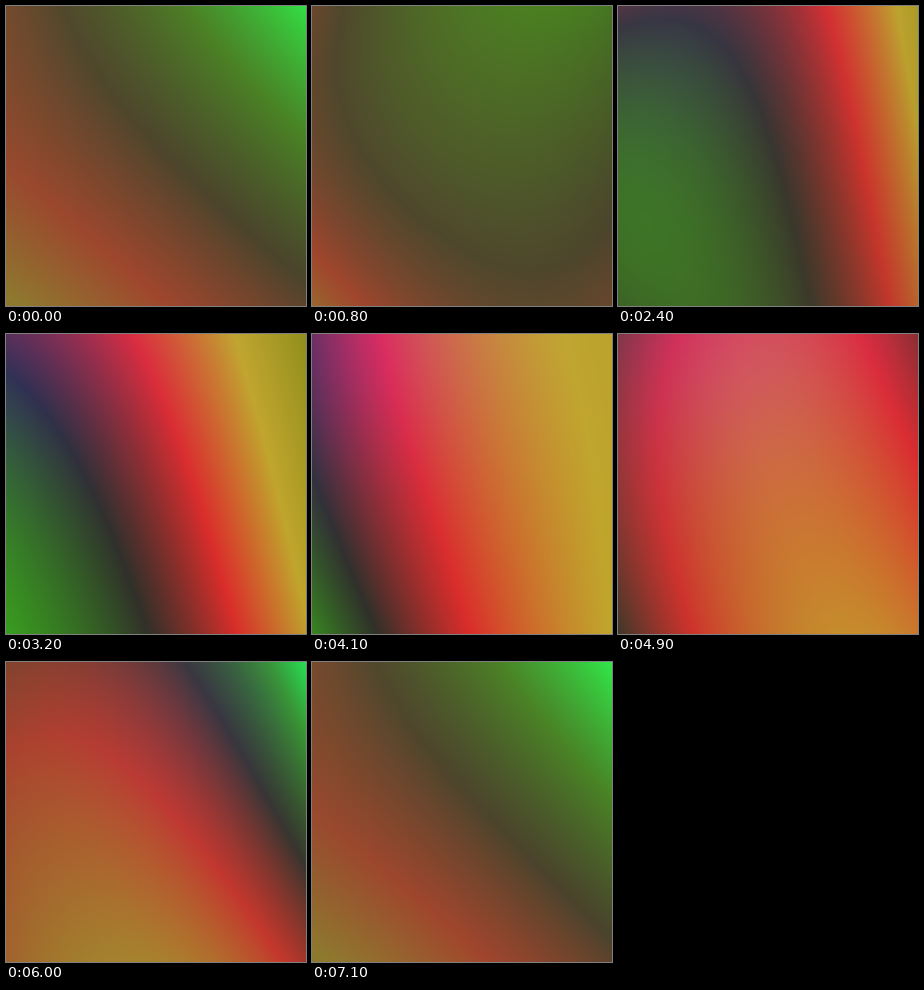
Write an HTML page with a canvas that moves like this. It is 300x300 px and loops after 7200 ms.

```html
<!DOCTYPE html>
<html lang="en">
<head>
<meta charset="utf-8">
<title>Colour drift</title>
<style>
  html, body { margin: 0; width: 100%; height: 100%; overflow: hidden; background: #000; }
  canvas { display: block; width: 100vw; height: 100vh; }
</style>
</head>
<body>
<canvas id="stage" width="300" height="300"></canvas>
<script>
const SIZE = 300, LOOP = 7200, STEP = 100;
const ctx = document.getElementById('stage').getContext('2d');
const image = ctx.createImageData(SIZE, SIZE);

// Bright green, green, shadow, red, yellow, olive
const ramp = [[30, 275, 78], [55, 150, 30], [48, 48, 40], [218, 45, 42], [192, 165, 44], [140, 140, 25]];
const earth = [108, 92, 48];

const mix = (a, b, k) => a + (b - a) * k;
const clamp = (v, lo, hi) => Math.min(hi, Math.max(lo, v));
const arch = s => 4 * s * (1 - s);

function draw(time) {
  const angle = time / LOOP * 2 * Math.PI;
  const wave = (base, swing, peak) => base + swing * Math.cos(angle - peak * Math.PI / 180);

  // Ramp position at the corners, and how far the field bows between them
  const topLeft = wave(2.38, 0.2, 300), topRight = wave(2.4, 2.5, 158);
  const lowLeft = wave(2.5, 1.6, 352), lowRight = wave(3.1, 0.95, 188);
  const bow = wave(-0.05, 0.9, 270), sideBow = wave(-0.15, 0.5, 250);

  // Blue glow sliding along the top edge
  const glowX = wave(0.5, 0.5, 350), glow = wave(28, 32, 210);

  const px = image.data;
  let o = 0;
  for (let row = 0; row < SIZE; row++) {
    const y = row / (SIZE - 1);
    const left = mix(topLeft, lowLeft, y), right = mix(topRight, lowRight, y);
    for (let col = 0; col < SIZE; col++) {
      const x = col / (SIZE - 1);
      const hue = mix(left, right, x) + bow * arch(x) + sideBow * arch(y) * (1 - x) ** 2;
      const pos = clamp(hue, 0, 4.999), i = Math.floor(pos);
      const rich = 0.5 - 0.5 * Math.cos(angle - 0.6 * x) + x * (0.5 - 0.35 * y);
      const dull = 0.6 * (1 - clamp(rich, 0, 1));
      const blue = glow * Math.exp(-4 * ((x - glowX) ** 2 + y * y));
      for (let c = 0; c < 3; c++) {
        const pure = mix(ramp[i][c], ramp[i + 1][c], pos - i);
        px[o++] = mix(pure, earth[c], dull) + (c === 2 ? blue : 0);
      }
      px[o++] = 255;
    }
  }
  ctx.putImageData(image, 0, 0);
}

const start = performance.now();
let shown = -1;
function tick() {
  const t = Math.floor((performance.now() - start) % LOOP / STEP) * STEP;
  if (t !== shown) draw(shown = t);
  requestAnimationFrame(tick);
}
tick();
</script>
</body>
</html>
```
